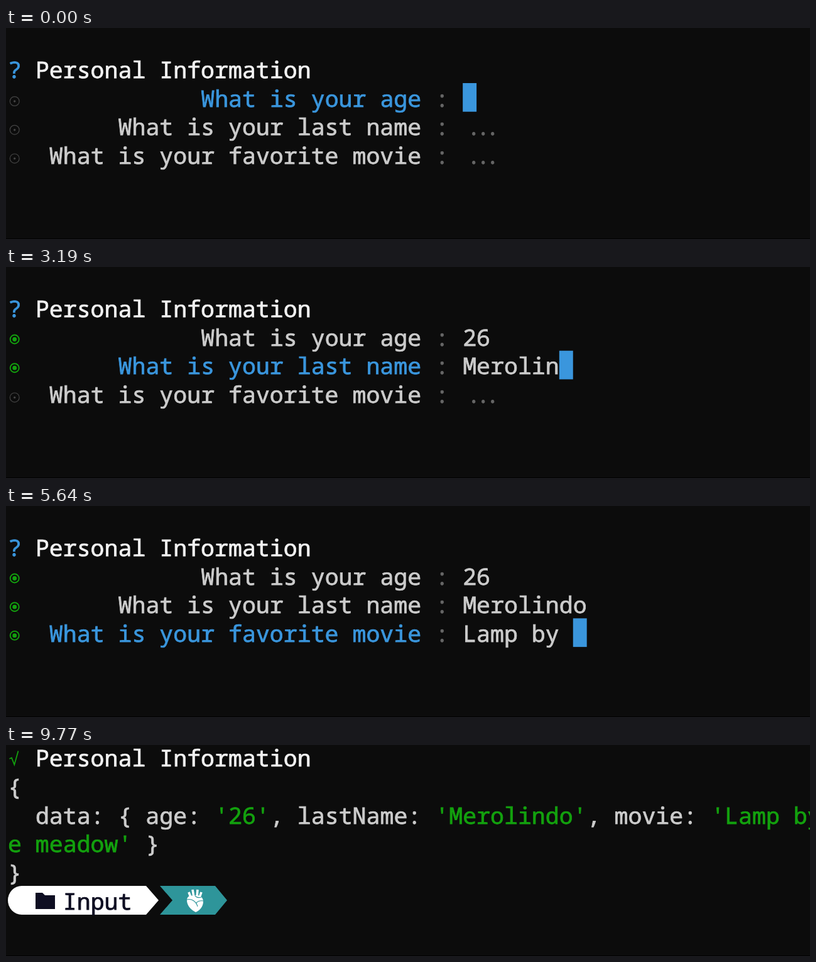
An HTML page that plays this animation: 1280 px wide and 337 px high, repeating every 9900 ms.

```html
<!DOCTYPE html>
<html lang="en">
<head>
<meta charset="utf-8">
<title>Terminal form</title>
<style>
  html, body { margin: 0; height: 100%; overflow: hidden; background: #0c0c0c; }
  svg { display: block; width: 100vw; height: 100vh; }
  text {
    font: 500 36.575px "Noto Sans Mono", "DejaVu Sans Mono", monospace;
    font-variant-ligatures: none;
    white-space: pre;
    text-rendering: geometricPrecision;
    stroke-width: .8px;
  }
</style>
</head>
<body>
<svg id="screen" viewBox="0 0 1280 337"></svg>
<script>
const LOOP = 9900, DONE = 8040;
const BLUE = '#3a96dd', GREEN = '#13a10e', GREY = '#ccc', DIM = '#666', WHITE = '#f2f2f2';

// Each field: label, typed answer, time it gets focus, time of each key press
const fields = [
  { label: 'What is your age', answer: '26', start: 0, keys: [720, 860] },
  { label: 'What is your last name', answer: 'Merolindo', start: 1660,
    keys: [2390, 2720, 2920, 2920, 3060, 3120, 3190, 3320, 3390] },
  { label: 'What is your favorite movie', answer: 'Lamp by the meadow', start: 3990,
    keys: [4380, 4720, 4910, 5040, 5180, 5440, 5570, 5640, 5970, 6040, 6110, 6240,
           6510, 6910, 7110, 7240, 7380, 7510] }
];

const colX = col => 3 + 21.945 * col;
const rowY = row => 88 + 45.7 * row;

// A thin outline in the fill colour thickens the letters
const text = (col, row, str, fill, extra = '') =>
  `<text x="${colX(col)}" y="${rowY(row) + 37.6}" fill="${fill}" stroke="${fill}" ${extra}>${str}</text>`;

const path = (d, fill, extra = '') => `<path d="${d}" fill="${fill}" ${extra}/>`;

const ring = (y, r, dot, width, color) =>
  `<circle cx="13.7" cy="${y}" r="${r}" fill="none" stroke="${color}" stroke-width="${width}"/>
   <circle cx="13.7" cy="${y}" r="${dot}" fill="${color}"/>`;

const cursor = (col, row) =>
  `<rect x="${colX(col)}" y="${rowY(row)}" width="21.945" height="45.7" fill="${BLUE}"/>`;

function field(f, row, t) {
  const active = t >= f.start && !(t >= fields[row + 1]?.start);
  const typed = f.keys.filter(k => k <= t).length;
  const y = rowY(row);
  let out = typed ? ring(y + 27.5, 7, 3.4, 1.9, GREEN) : ring(y + 29, 7.4, 1.7, 1.2, '#444');
  out += text(30 - f.label.length, row, f.label, active ? BLUE : GREY) + text(31, row, ':', DIM);
  if (t < f.start) out += text(33.3, row, '...', DIM, 'letter-spacing="-7"');
  else out += text(33, row, f.answer.slice(0, typed), GREY);
  return active ? out + cursor(33 + typed, row) : out;
}

const form = t =>
  text(0, -1, '?', BLUE) +
  text(2, -1, 'Personal Information', WHITE) +
  fields.map((f, i) => field(f, i, t)).join('');

function prompt(t) {
  const teal = '#2e959a', ink = '#0e0e22';
  const caret = t < 8640 || (t >= 9170 && t < 9770);
  return path('M25 225H223L243 248L223 271H25A22 23 0 0 1 25 225Z', '#fff') +
    path('M47 236H58L62 240H78V262H47Z', ink) +
    text(4, 3, 'Input', ink) +
    path('M245 225H333L352 248L333 271H245L265 248Z', teal) +
    path('M288 248C288 242 293 239 299 241C306 238 314 242 314 250C314 259 307 265 302 267C294 263 288 256 288 248Z', '#fff') +
    path('M294 243L291 235M299 243L297 231M304 243L305 231M308 244L311 235', 'none',
      'stroke="#fff" stroke-width="3.6"') +
    path('M288 247C296 245 303 250 305 258M303 252Q307 248 314 249M301 241Q305 245 311 243', 'none',
      `stroke="${teal}" stroke-width="1.1"`) +
    (caret ? '<rect x="376" y="225" width="1" height="46" fill="#fff"/>' : '');
}

function result(t) {
  const [age, name, movie] = fields.map(f => f.answer);
  return path('M5.5 22L9 20.5L13.3 31.5L19.5 9.5', 'none', `stroke="${GREEN}" stroke-width="1.8"`) +
    text(2, -2, 'Personal Information', WHITE) +
    text(0, -1, '{', GREY) +
    text(2, 0, 'data: { age:', GREY) + text(15, 0, `'${age}'`, GREEN) +
    text(19, 0, ', lastName:', GREY) + text(31, 0, `'${name}'`, GREEN) +
    text(42, 0, ', movie:', GREY) + text(51, 0, `'${movie.slice(0, 10)}`, GREEN) +
    text(0, 1, `${movie.slice(10)}'`, GREEN) + text(10, 1, '}', GREY) +
    text(0, 2, '}', GREY) +
    prompt(t);
}

const screen = document.getElementById('screen');
const edge = '<rect y="336" width="1280" height="1" fill="#000"/>';
let shown = '';

function draw() {
  const t = performance.now() % LOOP;
  const html = (t < DONE ? form(t) : result(t)) + edge;
  if (html !== shown) screen.innerHTML = shown = html;
  requestAnimationFrame(draw);
}
draw();
</script>
</body>
</html>
```
